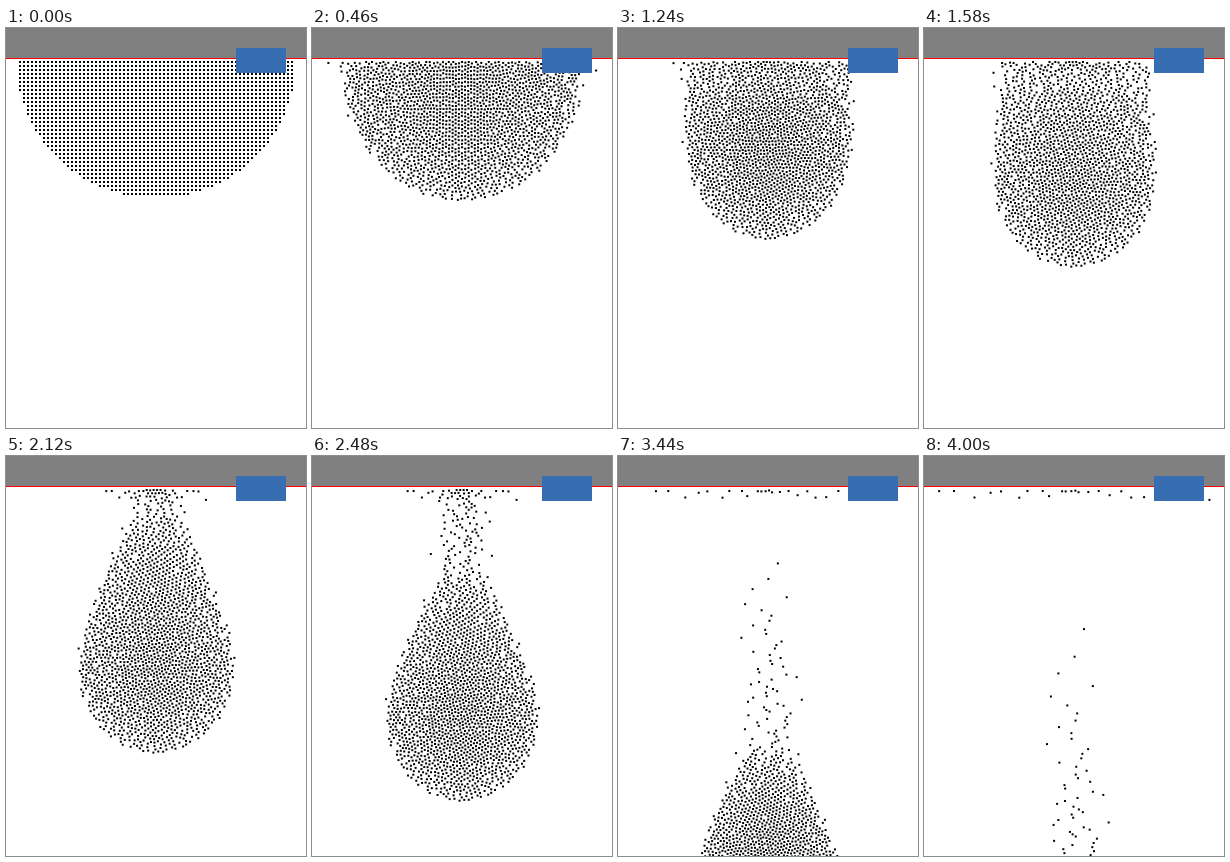
These frames come from a looping animation (300x400 px, 4.02 s). An HTML page with a canvas:

```html
<!DOCTYPE html>
<html lang="en">
<head>
<meta charset="utf-8">
<title>Falling drop</title>
<style>
  html, body { margin: 0; width: 100%; height: 100%; overflow: hidden; background: #fff; }
  canvas { display: block; }
</style>
</head>
<body>
<canvas id="stage" width="300" height="400"></canvas>
<script>
const ctx = document.getElementById('stage').getContext('2d');
const LOOP = 4020, STEP = 20, CX = 150, TOP = 34, STUCK = 24;

let seed = 7;
function rand() {
  seed = (seed + 0x6D2B79F5) | 0;
  let r = Math.imul(seed ^ (seed >>> 15), 1 | seed);
  r = (r + Math.imul(r ^ (r >>> 7), 61 | r)) ^ r;
  return ((r ^ (r >>> 14)) >>> 0) / 4294967296;
}

const bell = (t, mid, width) => Math.exp(-(((t - mid) / width) ** 2));
const smooth = p => p <= 0 ? 0 : p >= 1 ? 1 : p * p * (3 - 2 * p);

// Half disc of dots on a 4px grid; u is the place across, rank the place down
const dots = [];
for (let row = 0; row < 34; row++) {
  const y = TOP + row * 4;
  const half = Math.floor(Math.sqrt(140 * 140 - (y - 30) ** 2) / 4);
  for (let k = -half; k <= half; k++) {
    dots.push({
      x: CX + k * 4, y,
      u: k / half * (1 + 0.1 * (rand() - 0.5)),
      rank: row + (((k + half) * 0.618034 + row * 0.37) % 1),
      wobble: rand() - rand()
    });
  }
}
const N = dots.length;

// Some dots of the top row stay on the ceiling
const stuck = [];
for (let i = 0; i < STUCK; i++) {
  const v = i / (STUCK - 1) * 2 - 1, d = dots[Math.round((v + 1) * 34)];
  d.offset = 145 * v * Math.sqrt(Math.abs(v)) + 6 * (rand() - 0.5);
  d.hang = 35 + 10 * rand() ** 4;
  stuck.push(d);
}
const free = dots.filter(d => !stuck.includes(d)).sort((a, b) => a.rank - b.rank);

// Shape of the drop at t seconds
function dropAt(t) {
  const bottom = 167 + 29 * t * t;
  const belly = bottom - Math.max(88, 137 - 30 * t);
  const wide = 86 - 4.5 * t + 51 * bell(t, 0, 0.6);
  const fall = Math.max(0, t - 2.12), loose = Math.max(0, t - 2.48);
  const neckY = Math.min(belly - 10, 60 + 150 * fall + 19 * fall * fall);
  return {
    top: 34.5 + 50 * loose, bottom, belly, wide, neckY,
    neck: 20 + (wide - 20) / (1 + Math.exp((t - 1.82) / 0.11)),
    thin: 0.12 + 0.88 * bell(t, 0, 2.1),
    taper: loose * 1.32
  };
}

// Half width and density of the drop at height y
function slice(d, y) {
  if (y > d.belly) {
    const q = (y - d.belly) / (d.bottom - d.belly);
    return [d.wide * (1 - q * q) ** 0.53, 1 - 0.35 * q * q];
  }
  if (y > d.neckY) {
    const p = (y - d.neckY) / (d.belly - d.neckY);
    return [d.neck + (d.wide - d.neck) * p * (1.3 - 0.3 * p * p), d.thin + (1 - d.thin) * p ** 0.4];
  }
  return [d.neck, d.thin * ((y - d.top) / (d.neckY - d.top)) ** d.taper];
}

// Fill the drop from top to bottom, keeping the order of the dots
function fill(t) {
  const drop = dropAt(t), rows = 300, h = (drop.bottom - drop.top) / rows, sums = [0];
  for (let r = 0; r < rows; r++) {
    const [w, rho] = slice(drop, drop.top + (r + 0.5) * h);
    sums.push(sums[r] + w * rho);
  }
  let r = 0;
  free.forEach((d, i) => {
    const m = (i + 0.5) / free.length * sums[rows];
    while (r < rows - 1 && sums[r + 1] < m) r++;
    d.toY = drop.top + h * (r + (m - sums[r]) / (sums[r + 1] - sums[r]));
    const [w, rho] = slice(drop, d.toY);
    d.toX = CX + w * d.u * (0.88 + 0.12 * d.u * d.u) + d.wobble * 30 * (1 - rho) ** 2;
  });
  const reach = 1 - 0.66 * bell(t, 2.2, 1.2);
  for (const d of stuck) {
    d.toX = CX + d.offset * reach;
    d.toY = d.hang;
  }
}

// Push apart dots that are closer than gap
const CELL = 4, COLS = 84, ROWS = 180;
const xs = new Float64Array(N), ys = new Float64Array(N);
const head = new Int16Array(COLS * ROWS), next = new Int16Array(N), cells = new Int32Array(N);
const clamp = (v, max) => Math.max(1, Math.min(max - 2, Math.floor(v)));

function relax(gap, rounds) {
  while (rounds--) {
    head.fill(-1);
    for (let i = 0; i < N; i++) {
      const c = cells[i] = clamp(ys[i] / CELL, ROWS) * COLS + clamp(xs[i] / CELL + 4, COLS);
      next[i] = head[c];
      head[c] = i;
    }
    for (let i = 0; i < N; i++) {
      for (let dy = -COLS; dy <= COLS; dy += COLS) {
        for (let dx = -1; dx <= 1; dx++) {
          for (let j = head[cells[i] + dy + dx]; j >= 0; j = next[j]) {
            if (j <= i) continue;
            const ex = xs[i] - xs[j], ey = ys[i] - ys[j], d = Math.hypot(ex, ey);
            if (d >= gap || d < 1e-4) continue;
            const f = (gap - d) / d * 0.3;
            xs[i] += ex * f; ys[i] += ey * f;
            xs[j] -= ex * f; ys[j] -= ey * f;
          }
        }
      }
    }
    for (let i = 0; i < N; i++) ys[i] = Math.max(TOP, ys[i]);
  }
}

function rect(color, x, y, w, h) {
  ctx.fillStyle = color;
  ctx.fillRect(x, y, w, h);
}

function draw(ms) {
  const t = ms / 1000, melt = smooth(t / 0.6);
  fill(t);
  dots.forEach((d, i) => {
    xs[i] = d.x + (d.toX - d.x) * melt;
    ys[i] = d.y + (d.toY - d.y) * melt;
  });
  relax(3.55, 12);

  rect('#fff', 0, 0, 300, 400);
  ctx.fillStyle = '#000';
  for (let i = 0; i < N; i++) {
    if (ys[i] < 402) ctx.fillRect(xs[i] - 1, ys[i] - 1, 2, 2);
  }
  rect('#808080', 0, 0, 300, 30);
  rect('#f00', 0, 30, 300, 1);
  rect('#376eb1', 230, 20, 50, 25);
}

const start = performance.now();
let shown = -1;
function tick() {
  const ms = Math.floor((performance.now() - start) % LOOP / STEP) * STEP;
  if (ms !== shown) draw(shown = ms);
  requestAnimationFrame(tick);
}
tick();
</script>
</body>
</html>
```
